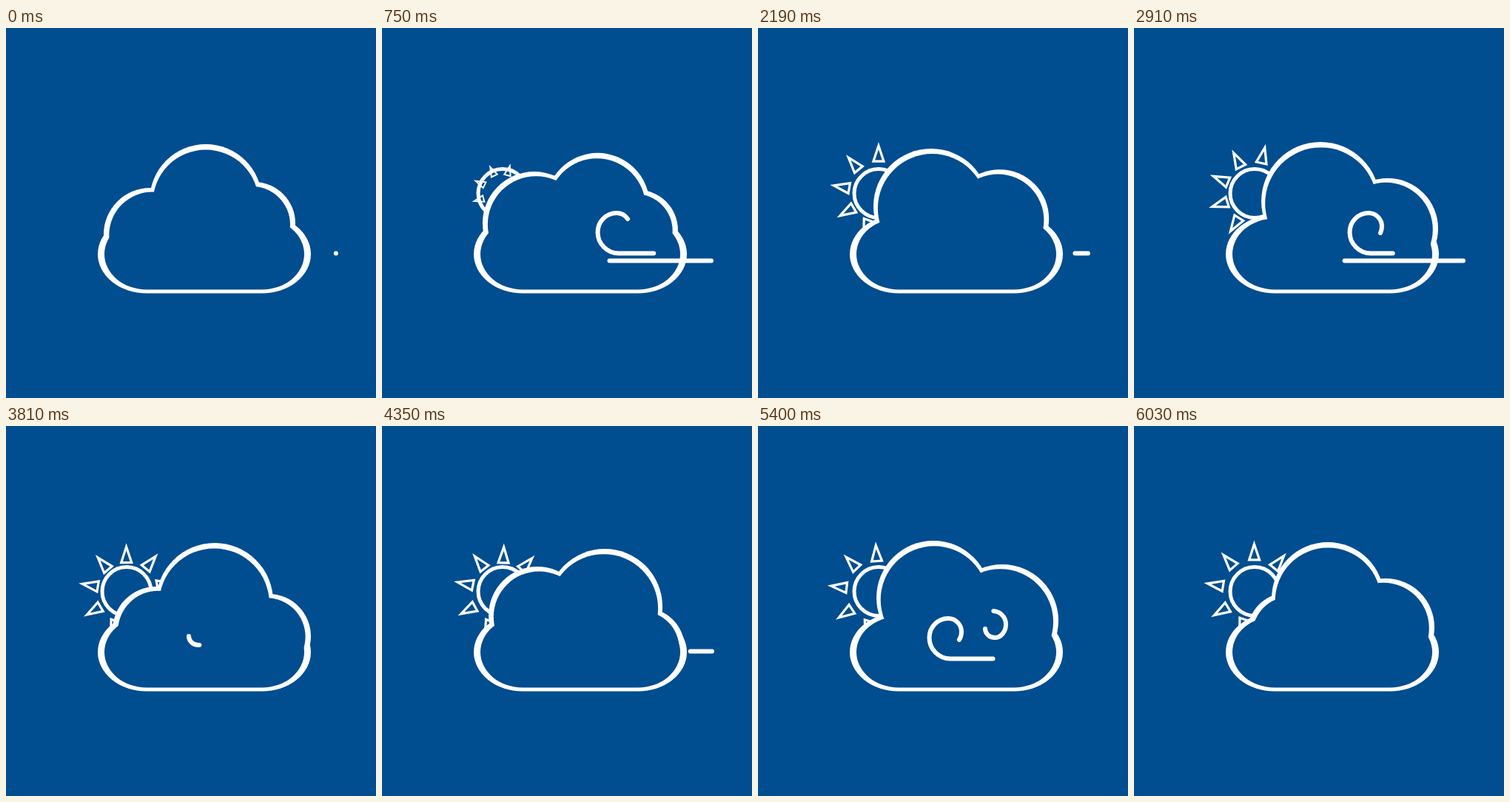
An HTML page with a canvas that plays this animation: 500 px wide and 500 px high, repeating every 6060 ms.

```html
<!DOCTYPE html>
<html lang="en">
<head>
<meta charset="utf-8">
<title>Cloudy and windy</title>
<style>
  html, body { margin: 0; height: 100%; overflow: hidden; background: #004d8f; }
  canvas { display: block; }
</style>
</head>
<body>
<canvas id="stage" width="500" height="500"></canvas>
<script>
const ctx = document.getElementById('stage').getContext('2d');
const BLUE = '#004d8f', WHITE = '#fff';
const LOOP = 6060, GUST = 2100, TAU = 2 * Math.PI, DEG = Math.PI / 180;
const HUB = { x: 268, y: 305 };

// Key times shared by the cloud puffs and the ray rotation
const TIMES = [0, 1440, 2910, 3810, 4350, 5400, 6030];
const RAY_TURN = [0, 105, 212.5, 279.5, 321.5, 396.5, 439.5];

// Each puff circles the hub: first key index, then x, y, radius per key
const PUFFS = [
  { from: 0, keys: [[335, 264, 56], [355, 283, 52], [345, 300, 45]] },
  { from: 0, keys: [[270, 233, 76], [308, 250, 65], [343, 271, 68], [355, 284, 57], [355, 300, 54], [345, 305, 45]] },
  { from: 0, keys: [[195, 279, 63], [218, 253, 76], [252, 234, 80], [282, 237, 79], [301, 244, 78], [330, 263, 76], [340, 272, 66]] },
  { from: 2, keys: [[200, 300, 50], [203, 276, 59], [210, 256, 66], [237, 232, 77], [262, 233, 76]] },
  { from: 5, keys: [[200, 303, 47], [208, 280, 55]] }
].map(({ from, keys }) => {
  const polar = keys.map(([x, y, r]) =>
    [Math.atan2(y - HUB.y, x - HUB.x), Math.hypot(x - HUB.x, y - HUB.y), r]);
  const times = TIMES.slice(from, from + keys.length);
  const track = i => polar.map(p => p[i]);
  return { times, angle: track(0), dist: track(1), radius: track(2) };
});

// A straight line that ends in a curl
const curl = (startX, x, y) => new Path2D(`M${startX} ${y}H${x}
  a28.5 28.5 0 0 1 -28.5 -28.5a25.5 26 0 0 1 25.5 -26a18 18 0 0 1 18 18
  a15 18 0 0 1 -15 18a13 12 0 0 1 -13 -12`);

const WINDS = [
  { path: curl(446, 320, 304.5), length: 285,
    head: [[0, 150, 810, 930], [0, 29, 248, 285]],
    tail: [[480, 810, 1200, 1430], [0, 96, 212, 285]] },
  { path: curl(445, 260, 314.5), length: 345,
    head: [[390, 810, 1200, 1300], [0, 160, 309, 345]],
    tail: [[840, 1050, 1200, 1440, 1710, 1790], [0, 60, 127, 240, 322, 345]] }
];

const clamp = v => Math.min(1, Math.max(0, v));
const easeOut = v => 1 - (1 - clamp(v)) ** 3;

function lerpKeys(times, values, t) {
  let i = 0;
  while (i < times.length - 2 && t > times[i + 1]) i++;
  const k = clamp((t - times[i]) / (times[i + 1] - times[i]));
  return values[i] + (values[i + 1] - values[i]) * k;
}

function drawSun(t) {
  ctx.save();
  ctx.translate(163, 223.5);
  ctx.strokeStyle = WHITE;

  const size = easeOut(t / 500);
  if (size > 0) {
    ctx.save();
    ctx.scale(size, size);
    ctx.lineWidth = 5;
    ctx.beginPath();
    ctx.arc(0, 0, 33, 0, TAU);
    ctx.stroke();
    ctx.restore();
  }

  const grow = easeOut((t - 600) / 550);
  if (grow > 0) {
    ctx.rotate(lerpKeys(TIMES, RAY_TURN, t) * DEG);
    ctx.scale(grow, grow);
    ctx.lineWidth = 3.2;
    for (let k = 0; k < 9; k++) {
      const out = 2.5 * Math.cos((40 * k - 228) * DEG);
      ctx.beginPath();
      ctx.moveTo(0, -62.3 - out);
      ctx.lineTo(7, -41.1 - out);
      ctx.lineTo(-7, -41.1 - out);
      ctx.closePath();
      ctx.stroke();
      ctx.rotate(40 * DEG);
    }
  }
  ctx.restore();
}

// Flat-sided pill with elliptical ends
function fillBase(rx, ry) {
  ctx.beginPath();
  ctx.ellipse(190, 305.5, rx, ry, 0, TAU / 4, TAU * 3 / 4);
  ctx.ellipse(346, 305.5, rx, ry, 0, -TAU / 4, TAU / 4);
  ctx.fill();
}

// The inside is smaller and pulled to the hub, so the rim is thicker outward
function fillCloud(t, color, shrink, pull) {
  ctx.fillStyle = color;
  for (const p of PUFFS) {
    if (t < p.times[0] || t > p.times.at(-1) + 30) continue;
    const angle = lerpKeys(p.times, p.angle, t);
    const dist = lerpKeys(p.times, p.dist, t) - pull;
    const radius = lerpKeys(p.times, p.radius, t) - shrink;
    ctx.beginPath();
    ctx.arc(HUB.x + dist * Math.cos(angle), HUB.y + dist * Math.sin(angle), radius, 0, TAU);
    ctx.fill();
  }
}

function drawCloud(t) {
  fillCloud(t, WHITE, 0, 0);
  fillBase(66, 53);
  fillCloud(t, BLUE, 4.5, 3);
  fillBase(57, 48);
}

function drawWind(t) {
  const phase = t % GUST;
  ctx.save();
  ctx.strokeStyle = WHITE;
  ctx.lineWidth = 6;
  ctx.lineCap = ctx.lineJoin = 'round';
  for (const { path, length, head, tail } of WINDS) {
    const start = lerpKeys(...tail, phase);
    const end = lerpKeys(...head, phase);
    if (phase < head[0][0] || start >= length) continue;
    ctx.setLineDash([Math.max(0.01, end - start), 2000]);
    ctx.lineDashOffset = -start;
    ctx.stroke(path);
  }
  ctx.restore();
}

const begin = performance.now();

function draw() {
  const t = (performance.now() - begin) % LOOP;
  ctx.fillStyle = BLUE;
  ctx.fillRect(0, 0, 500, 500);
  drawSun(t);
  drawCloud(t);
  drawWind(t);
  requestAnimationFrame(draw);
}
draw();
</script>
</body>
</html>
```
